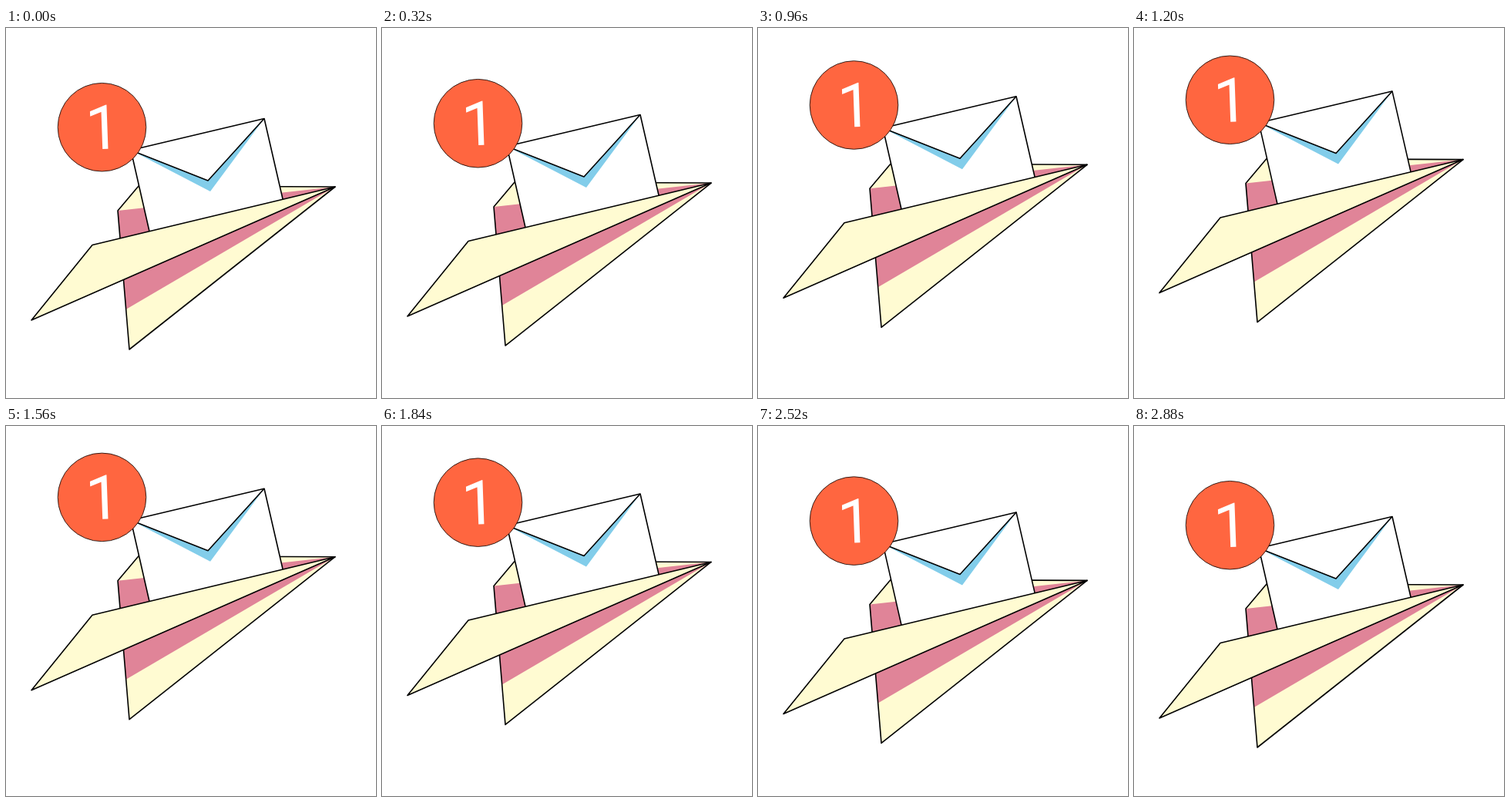
These frames come from a looping animation (480 by 480 pixels, 2.92 s). An HTML page:

```html
<!DOCTYPE html>
<html lang="en">
<head>
<meta charset="utf-8">
<title>New mail</title>
<style>
  html, body { margin: 0; width: 100%; height: 100%; overflow: hidden; background: #fff; }
  svg { display: block; width: 100vw; height: 100vh; }
  .line { stroke: #000; stroke-width: 1.6; stroke-linejoin: round; }
  .cream { fill: #fffbd2; }
  .pink { fill: #e08498; }
  .white { fill: #fff; }
  .blue { fill: #82cdea; }
  .none { fill: none; }
  text { font: 400 80px Roboto, Arial, sans-serif; fill: #fff; }
</style>
</head>
<body>
<svg viewBox="0 0 480 480">
  <g id="plane">
    <!-- far wing and keel -->
    <path class="cream" d="M145 237L172 205L427 206L160 417Z"/>
    <path class="pink" d="M145 237L427 206L155.7 365Z"/>
    <path class="none line" d="M145 237L172 205L427 206L160 417Z"/>
    <!-- envelope -->
    <path class="white line" d="M162 158.5L335 117.5L359.5 224L186.5 266Z"/>
    <path class="blue" d="M163 159L265 212L335 117.5L262 198Z"/>
    <path class="none line" d="M162 158.5L262 198L335 117.5"/>
    <!-- near wing -->
    <path class="cream line" d="M112 281.5L427 206L33 379Z"/>
    <!-- badge -->
    <circle cx="124.5" cy="128.7" r="57.3" fill="#ff6640" stroke="#000" stroke-width=".8"/>
    <text x="104" y="157" transform="rotate(-2 128 157)">1</text>
  </g>
</svg>
<script>
  const LOOP = 2920, STEP = 40, PEAK = 1400, END = 2880, RISE = 37.5;
  const plane = document.getElementById('plane');
  const ease = x => x * x * (3 - 2 * x);

  function lift(t) {
    const x = t < PEAK ? t / PEAK : (END - t) / (END - PEAK);
    return RISE * ease(Math.max(0, x));
  }

  const start = performance.now();
  function draw(now) {
    const t = Math.max(0, now - start) % LOOP;
    const y = -lift(Math.floor(t / STEP) * STEP);
    plane.setAttribute('transform', `translate(0 ${y.toFixed(2)})`);
    requestAnimationFrame(draw);
  }
  draw(start);
</script>
</body>
</html>
```
